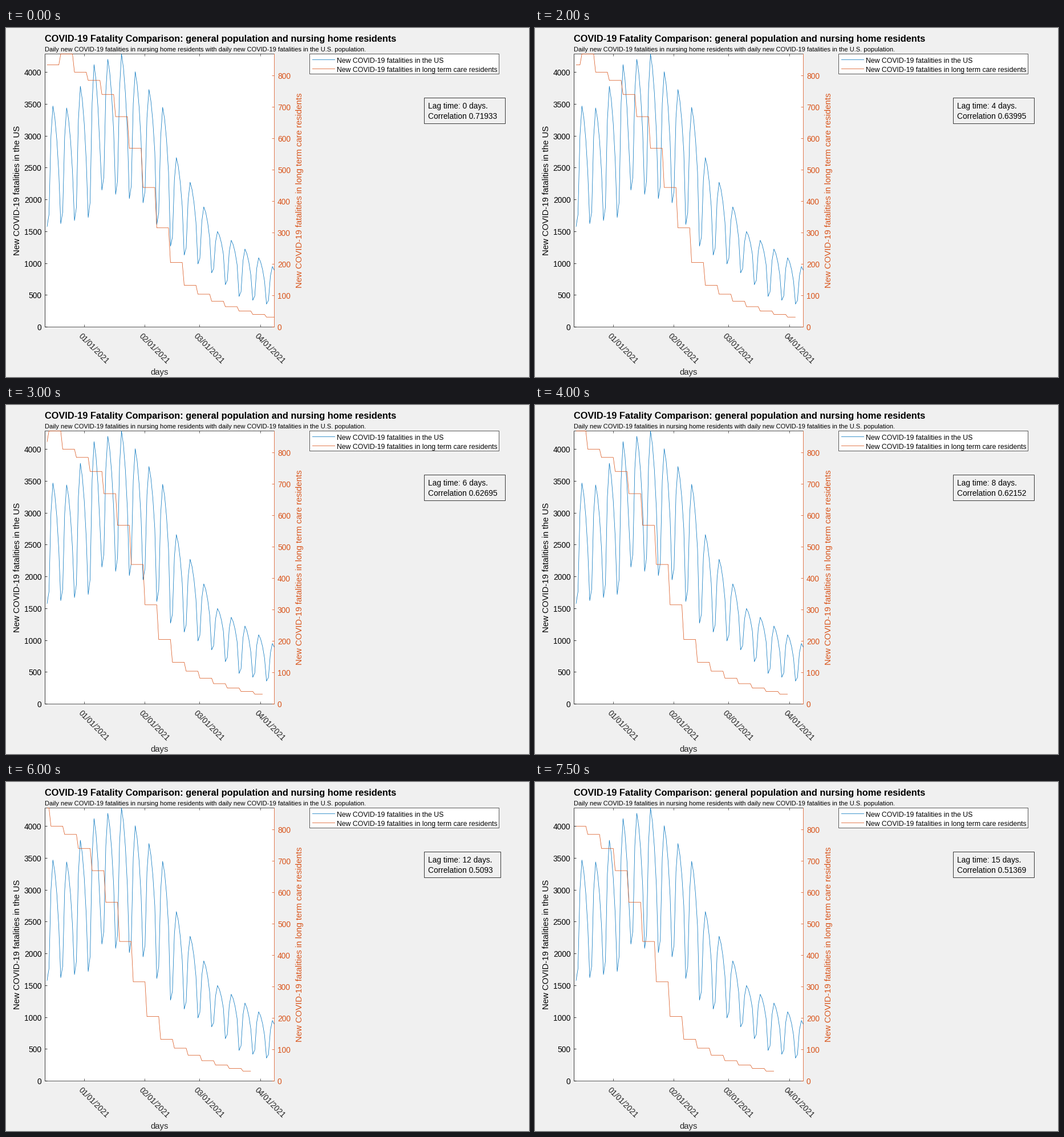
Recreate the animation shown at these times as a matplotlib script. Size 917x611 px, loop 8 s.

```python
import numpy as np
import matplotlib.pyplot as plt
from matplotlib.animation import FuncAnimation
from matplotlib.patches import Rectangle

W, H, DPI = 917, 611, 64
PT = 72 / DPI  # points per pixel
LEFT, RIGHT, TOP, BOTTOM = 68.5, 470.5, 45.5, 523.5
DAYS, LAGS, US_MAX, CARE_MAX = 117, 16, 4287, 870

BLUE, ORANGE = (0, 0.447, 0.741), (0.85, 0.325, 0.098)
DARK, PAPER = (0.15, 0.15, 0.15), (240 / 255,) * 3
THIN = 0.75

US_NAME = "New COVID-19 fatalities in the US"
CARE_NAME = "New COVID-19 fatalities in long term care residents"

days = np.arange(1, DAYS + 1)
week, weekday = np.divmod(days - 1, 7)


def us_deaths():
    """Weekly reporting rhythm between a falling low and high level."""
    rhythm = np.array([0, 0.1, 0.75, 1, 0.9, 0.72, 0.45])[weekday]
    high = np.interp(week, [0, 1, 3, 5, 8, 9, 12, 16],
                     [3470, 3440, 4120, US_MAX, 3450, 2660, 1500, 950])
    low = np.interp(week, [0, 3, 4, 7, 9, 12, 14, 16],
                    [1575, 1720, 2150, 1950, 1270, 850, 480, 360])
    return low + (high - low) * rhythm


def care_deaths():
    """Weekly steps: logistic decline, one early surge, exponential tail."""
    decline = 845 / (1 + np.exp(0.62 * (week - 7.17))) + 43 * (week == 1)
    return np.where(week < 10, decline, 133 * np.exp(-0.24 * (week - 10)))


def correlation(lag):
    return np.interp(lag, [0, 2, 4, 5, 6, 8, 10, 12, 15],
                     [0.71933, 0.6764, 0.63995, 0.6312, 0.62695,
                      0.62152, 0.56863, 0.5093, 0.51369])


plt.rcParams["font.family"] = "Liberation Sans"
fig = plt.figure(figsize=(W / DPI, H / DPI), dpi=DPI, facecolor=PAPER)
ax = fig.add_axes([0, 0, 1, 1])
ax.set(xlim=(0, W), ylim=(H, 0))
ax.axis("off")


def x_at(day):
    return LEFT + (RIGHT - LEFT) * np.asarray(day) / DAYS


def y_at(value, top):
    return BOTTOM - (BOTTOM - TOP) * np.asarray(value) / top


def crisp(v):
    return np.floor(v) + 0.5


def line(x, y, color, z=2):
    return ax.plot(x, y, color=color, lw=THIN * PT, zorder=z, snap=False,
                   solid_capstyle="butt", solid_joinstyle="round")[0]


def text(x, y, s, size, color="black", **kw):
    return ax.text(x, y, s, fontsize=size * PT, color=color, zorder=6,
                   va="baseline", **kw)


def box(x0, y0, x1, y1, face, edge=DARK):
    patch = Rectangle((x0, y0), x1 - x0, y1 - y0, fc=face, ec=edge,
                      lw=THIN * PT, zorder=1, snap=False)
    return ax.add_patch(patch)


def draw_axes():
    box(LEFT, TOP, RIGHT, BOTTOM, "white", "none")
    for y in (TOP, BOTTOM):
        line([LEFT, RIGHT], [y, y], DARK)
    for x, color in ((LEFT, "black"), (RIGHT, ORANGE)):
        line([x, x], [TOP, BOTTOM], color)

    for v in range(0, 4001, 500):
        y = crisp(y_at(v, US_MAX))
        line([LEFT, LEFT + 4], [y, y], "black")
        text(62.5, y + 5.2, str(v), 13.8, ha="right")
    for v in range(0, 801, 100):
        y = crisp(y_at(v, CARE_MAX))
        line([RIGHT - 4, RIGHT], [y, y], ORANGE)
        text(476, y + 5.2, str(v), 13.8, ORANGE)
    for month, day in enumerate((20, 51, 79, 110), 1):
        x = crisp(x_at(day))
        line([x, x], [BOTTOM - 4, BOTTOM], DARK)
        line([x, x], [TOP, TOP + 4], DARK)
        text(x + 13.5, 564, f"{month:02d}/01/2021", 13.8, DARK, ha="center",
             rotation=-45, rotation_mode="anchor")

    upright = dict(ha="center", rotation=90, rotation_mode="anchor")
    text(24.5, 284.5, US_NAME, 14.85, **upright)
    text(518.5, 284, CARE_NAME, 14.9, ORANGE, **upright)
    text(269.5, 607.5, "days", 14.9, DARK, ha="center")


def draw_legend():
    box(532.5, 45.5, 864.5, 80.5, "white")
    for y, color, name in ((55.5, BLUE, US_NAME), (71.5, ORANGE, CARE_NAME)):
        line([537, 577], [y, y], color)
        text(580, y + 5.6, name, 12.25)


text(67.5, 23.7, "COVID-19 Fatality Comparison: general population and "
     "nursing home residents", 16.34, weight="bold")
text(67.5, 41.2, "Daily new COVID-19 fatalities in nursing home residents with "
     "daily new COVID-19 fatalities in the U.S. population.", 11.07)
draw_axes()
draw_legend()

care = care_deaths()
line(x_at(days), y_at(us_deaths(), US_MAX), BLUE, 3)
care_line = line([], [], ORANGE, 4)
note = box(733.5, 122.5, 875.5, 167.5, PAPER, "black")
lag_text = text(740, 141, "", 13.72)
corr_text = text(740, 158.7, "", 13.7)


def update(lag):
    care_line.set_data(x_at(days[:DAYS - lag]), y_at(care[lag:], CARE_MAX))
    caption = f"Correlation {correlation(lag):.5g}"
    lag_text.set_text(f"Lag time: {lag} days.")
    corr_text.set_text(caption)
    note.set_width(142 - 8 * (19 - len(caption)))  # one digit is 8 px wide
    return care_line, note, lag_text, corr_text


anim = FuncAnimation(fig, update, frames=LAGS, interval=500, repeat=True)
plt.show()
```
